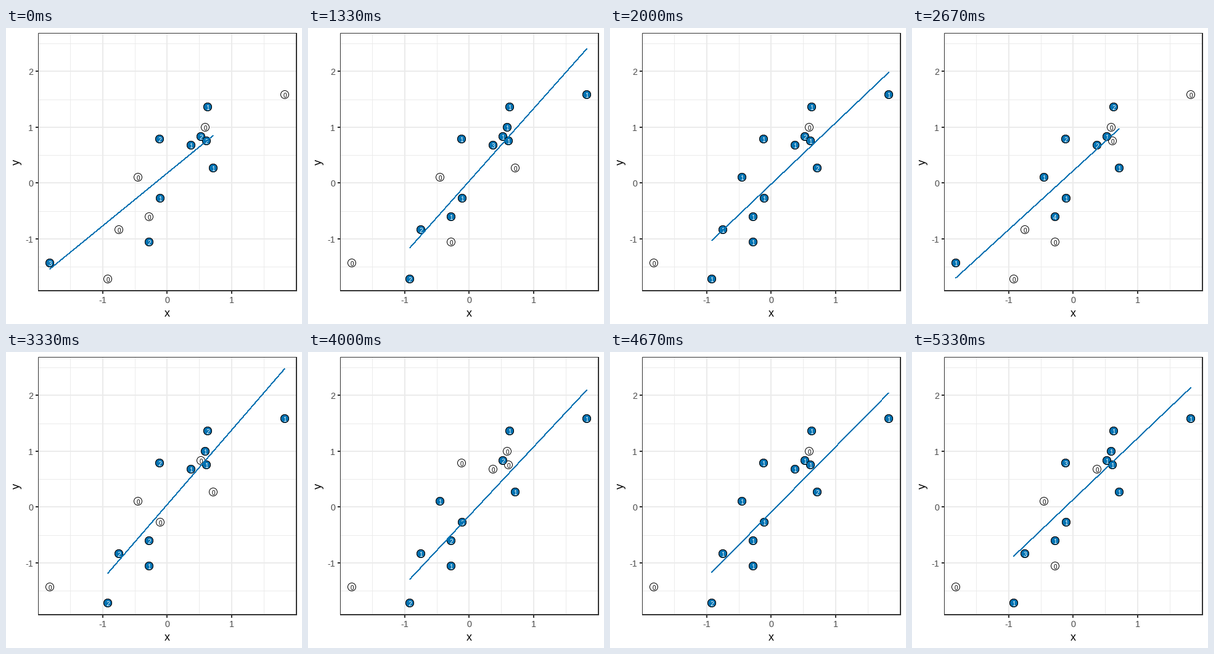
Recreate the animation shown at these times as a matplotlib script. Size 480 by 480 pixels, loop 6670 ms.

```python
import numpy as np
import matplotlib.pyplot as plt
from matplotlib.animation import FuncAnimation
from matplotlib.patches import Circle

SIZE, DPI = 480, 96
PX = 72 / DPI  # points per pixel
BLUE, DARK, GRID = "#0072B2", "#333333", "#EBEBEB"
LEFT, TOP, RIGHT, BOTTOM = 52, 8, 471, 426
STEP, LOOP = 23, 6670  # ms

plt.rcParams["font.family"] = ["Liberation Sans", "DejaVu Sans"]

# Point centres in pixels
X = np.array([71, 165, 183, 214, 232, 232, 249, 250, 300, 316, 323, 325, 327, 336, 452])
Y = np.array([381, 407, 327, 242, 306, 347, 180, 276, 190, 176, 161, 183, 128, 227, 108])

# Bootstrap draws (how often each point is picked) and when each one ends
DRAWS = [
    "300002211202110",
    "022010113111101",
    "011111111201121",
    "100140212100210",
    "022021201011201",
    "021121030200111",
    "021111111101121",
    "013010310111111",
]
CHANGES = [1330, 2000, 2670, 3330, 4000, 4670, 5330]

fig = plt.figure(figsize=(SIZE / DPI, SIZE / DPI), dpi=DPI, facecolor="white")
ax = fig.add_axes([0, 0, 1, 1])
ax.set_xlim(0, SIZE)
ax.set_ylim(SIZE, 0)
ax.axis("off")


def rule(xs, ys, color, width, z):
    ax.plot(xs, ys, color=color, lw=width * PX, zorder=z,
            solid_capstyle="butt")


def label(x, y, text, size, color, z=8, ha="center", rotation=0):
    return ax.text(x, y, text, fontsize=size * PX, color=color, ha=ha,
                   va="baseline", rotation=rotation,
                   rotation_mode="anchor", zorder=z)


def disc(x, y, fill, z):
    return ax.add_patch(Circle((x, y), 6.5, fc=fill, ec="black",
                               lw=PX, zorder=z))


def draw_panel():
    for x in (104, 209, 313, 418):
        rule([x, x], [TOP, BOTTOM], GRID, 1, 0)
    for y in (25, 116, 206, 297, 387):
        rule([LEFT, RIGHT], [y, y], GRID, 1, 0)
    for x, name in ((157, "-1"), (261, "0"), (366, "1")):
        rule([x, x], [TOP, BOTTOM], GRID, 2, 0.5)
        rule([x, x], [BOTTOM, BOTTOM + 4.5], DARK, 2, 1)
        label(x, 446, name, 14.4, "#4D4D4D")
    for y, name in ((70, "2"), (161, "1"), (251, "0"), (342, "-1")):
        rule([LEFT, RIGHT], [y, y], GRID, 2, 0.5)
        rule([LEFT - 4.5, LEFT], [y, y], DARK, 2, 1)
        label(44, y + 6, name, 14.4, "#4D4D4D", ha="right")
    # The panel clips the outer half of the left and top border
    rule([LEFT, LEFT], [TOP, BOTTOM], DARK, 1, 7)
    rule([LEFT, RIGHT], [TOP, TOP], DARK, 1, 7)
    rule([RIGHT, RIGHT], [TOP, BOTTOM + 1], DARK, 2, 7)
    rule([LEFT, RIGHT + 1], [BOTTOM, BOTTOM], DARK, 2, 7)
    label(261.5, 468, "x", 18, "black")
    label(22, 217, "y", 18, "black", rotation=90)


draw_panel()
picked = []
for x, y in zip(X, Y):
    disc(x, y, "white", 2)
    label(x, y + 5, "0", 10, "black", 3)
    picked.append((disc(x, y, BLUE, 4), label(x, y + 5, "", 10, "white", 5)))
fit_line, = ax.plot([], [], color=BLUE, lw=0.7 * PX, zorder=6,
                    solid_capstyle="butt", antialiased=False)


def update(frame):
    # Show the draw that is current when the step ends
    index = np.searchsorted(CHANGES, (frame + 1) * STEP)
    counts = np.array([int(c) for c in DRAWS[index]])
    for n, (dot, text) in zip(counts, picked):
        dot.set_visible(n > 0)
        text.set_text(str(n) if n else "")
    slope, base = np.polyfit(X, Y, 1, w=np.sqrt(counts))
    used = X[counts > 0]
    ends = np.array([used.min(), used.max()])
    fit_line.set_data(ends, slope * ends + base)
    return []


anim = FuncAnimation(fig, update, frames=LOOP // STEP, interval=STEP,
                     init_func=lambda: update(0), repeat=True,
                     repeat_delay=0, blit=False)
plt.show()
```
